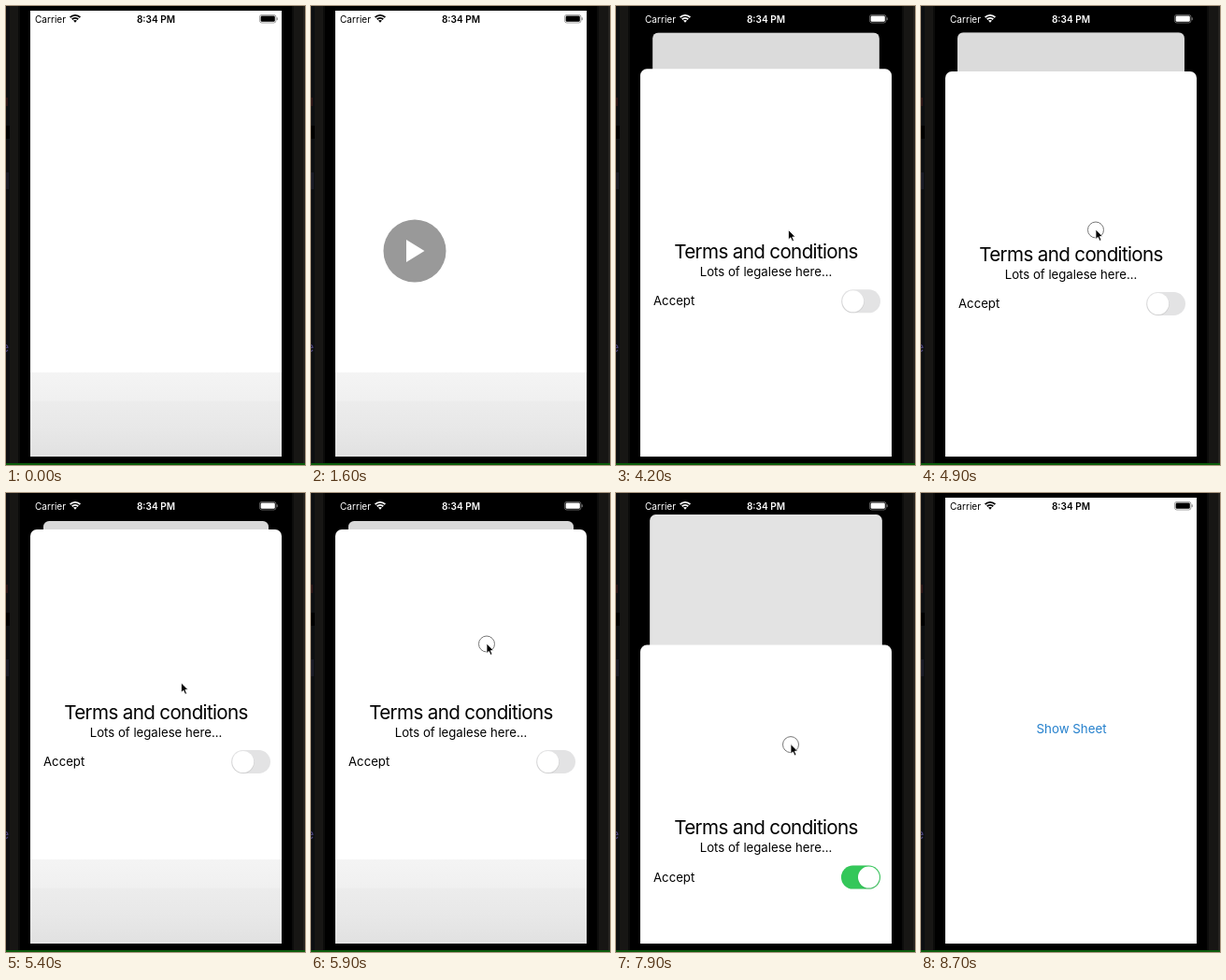
Recreate the animation shown at these times as an HTML page with a canvas. Size 320x491 px, loop 9.6 s.

```html
<!DOCTYPE html>
<html lang="en">
<head>
<meta charset="utf-8">
<title>Sheet demo</title>
<style>
html, body { margin: 0; width: 100%; height: 100%; overflow: hidden; background: #000; }
canvas { display: block; width: 320px; height: 491px; }
</style>
</head>
<body>
<canvas id="stage"></canvas>
<script>
const W = 320, H = 491, LOOP = 9600, STEP = 100;
const SCREEN = { x: 26, y: 5, w: 269, h: 477 };
const BOTTOM = SCREEN.y + SCREEN.h, REST = 39;
const FONT = 'Inter, Roboto, sans-serif';
const canvas = document.getElementById('stage');
const ctx = canvas.getContext('2d');
const dpr = window.devicePixelRatio || 1;
canvas.width = W * dpr;
canvas.height = H * dpr;

const clamp = v => Math.max(0, Math.min(1, v));
const ramp = (t, a, b) => clamp((t - a) / (b - a));
const linear = u => u;
const easeOut = u => 1 - (1 - u) ** 3;
const easeIn = u => u * u;
const easeBoth = u => u * u * (3 - 2 * u);

// Each key: time, values..., easing into that key
function track(keys, t) {
  let prev = keys[0];
  if (t <= prev.t) return prev.v;
  for (const key of keys) {
    if (t < key.t) {
      const u = (key.ease || easeBoth)((t - prev.t) / (key.t - prev.t));
      return prev.v.map((v, i) => v + (key.v[i] - v) * u);
    }
    prev = key;
  }
  return prev.v;
}
const key = (t, v, ease) => ({ t, v, ease });

const sheetKeys = [
  key(3900, [BOTTOM]), key(4400, [REST], easeOut), key(4600, [REST]),
  key(4900, [70], linear), key(5000, [72]), key(5400, [REST], easeOut),
  key(5900, [REST]), key(6200, [68], linear), key(6500, [REST], easeOut),
  key(7600, [REST]), key(8100, [245], linear), key(8600, [BOTTOM], easeOut)
];
const cursorKeys = [
  key(3300, [264, -9]), key(3500, [295, 70]), key(3900, [184, 254]),
  key(4100, [184, 254]), key(4500, [187, 161]), key(4600, [187, 161]),
  key(4900, [187, 239], linear), key(5100, [187, 245]), key(5700, [188, 161]),
  key(5900, [188, 161]), key(6200, [188, 236], linear), key(6300, [190, 238]),
  key(6700, [278, 305]), key(7000, [267, 289]), key(7300, [267, 289]),
  key(7600, [187, 145]), key(8100, [187, 351], linear), key(8500, [187, 355])
];
const presses = [[3900, 4000], [4600, 5000], [5900, 6300], [7200, 7300], [7600, 8200]];

function rect(x, y, w, h, fill) {
  ctx.fillStyle = fill;
  ctx.fillRect(x, y, w, h);
}

function round(x, y, w, h, r, fill) {
  ctx.beginPath();
  ctx.roundRect(x, y, w, h, r);
  ctx.fillStyle = fill;
  ctx.fill();
}

function disc(x, y, r, fill) {
  ctx.beginPath();
  ctx.arc(x, y, r, 0, 7);
  ctx.fillStyle = fill;
  ctx.fill();
}

function polygon(points, fill) {
  ctx.beginPath();
  points.forEach(([x, y]) => ctx.lineTo(x, y));
  ctx.closePath();
  ctx.fillStyle = fill;
  ctx.fill();
}

function text(str, x, y, size, fill, { align = 'center', weight = 400, gap = 0 } = {}) {
  ctx.font = `${weight} ${size}px ${FONT}`;
  ctx.letterSpacing = gap + 'px';
  ctx.textAlign = align;
  ctx.textBaseline = 'alphabetic';
  ctx.fillStyle = fill;
  ctx.fillText(str, x, y);
  ctx.letterSpacing = '0px';
}

function drawBezel() {
  rect(0, 0, W, H, '#000');
  rect(0, 0, 4, 489, '#0d0f12');
  rect(4, 0, 10, 489, '#171614');
  rect(13, 0, 2, 489, '#0b0b0a');
  rect(306, 0, 12, 489, '#171614');
  rect(306, 0, 2, 489, '#0c0c0b');
  rect(318, 0, 2, 489, '#24221f');
  rect(0, 98, 2, 9, '#2c1616');
  rect(0, 128, 4, 14, '#000');
  rect(0, 178, 3, 18, '#1a1b26');
  text('e', -4.5, 370, 13, '#4c4583', { align: 'left' });
  rect(0, 489, W, 2, '#0b5c0b');
}

function drawShade() {
  const g = ctx.createLinearGradient(0, 392, 0, BOTTOM);
  [[0, '#f4f4f4'], [0.33, '#f0f0f0'], [0.35, '#ececec'], [0.66, '#e8e8e8'], [1, '#e1e1e1']]
    .forEach(([at, color]) => g.addColorStop(at, color));
  rect(SCREEN.x, 392, SCREEN.w, BOTTOM - 392, g);
}

function drawHome(t, p) {
  const scale = 1 - p * 28 / SCREEN.w;
  ctx.save();
  ctx.translate(SCREEN.x + 14 * p, SCREEN.y + 25 * p);
  ctx.scale(scale, scale);
  ctx.translate(-SCREEN.x, -SCREEN.y);
  ctx.beginPath();
  ctx.roundRect(SCREEN.x, SCREEN.y, SCREEN.w, SCREEN.h, p > 0 ? 7 : 0);
  ctx.clip();
  rect(SCREEN.x, SCREEN.y, SCREEN.w, SCREEN.h, '#fff');
  if (t < 4300) drawShade();
  ctx.globalAlpha = t < 4300 ? ramp(t, 2500, 3100) : 1;
  text('Show Sheet', 161, 256.8, 13.3, '#2580cd');
  ctx.globalAlpha = 1;
  rect(SCREEN.x, SCREEN.y, SCREEN.w, SCREEN.h, `rgba(0,0,0,${0.15 * p})`);
  ctx.restore();
}

function drawPlay(t) {
  if (t < 1600 || t >= 2000) return;
  const u = (t - 1600) / 400;
  ctx.save();
  ctx.translate(111, 262);
  ctx.scale(1 + u * 0.58, 1 + u * 0.58);
  ctx.globalAlpha = 1 - u;
  disc(0, 0, 33.5, '#999');
  polygon([[-9, -12], [-9, 12], [10.5, 0]], '#fff');
  ctx.restore();
}

function drawToggle(x, y, on) {
  round(x, y, 42, 25, 12.5, '#e3e3e4');
  ctx.globalAlpha = on;
  round(x, y, 42, 25, 12.5, '#34c759');
  ctx.globalAlpha = 1;
  const kx = x + 12.7 + on * 16.8;
  disc(kx, y + 13.2, 12, 'rgba(0,0,0,0.08)');
  disc(kx, y + 12.5, 11.5, '#fff');
}

function drawSheet(t, y) {
  if (y >= BOTTOM) return;
  ctx.save();
  ctx.beginPath();
  ctx.rect(SCREEN.x, SCREEN.y, SCREEN.w, SCREEN.h);
  ctx.clip();
  round(SCREEN.x, y, SCREEN.w, H, 7, '#fff');
  if (t >= 5400 && t < 6000) drawShade();
  text('Terms and conditions', 160.5, y + 202.5, 20.6, '#000', { gap: -0.65 });
  text('Lots of legalese here...', 160.5, y + 221.5, 13.2, '#000');
  text('Accept', 40, y + 253, 13.2, '#000', { align: 'left' });
  drawToggle(241, y + 236, easeBoth(ramp(t, 7200, 7500)));
  ctx.restore();
}

function drawStatus(color) {
  text('Carrier', 31, 17.6, 10.1, color, { align: 'left' });
  text('8:34 PM', 160.5, 17.6, 10.1, color, { weight: 600 });
  ctx.strokeStyle = color;
  ctx.lineWidth = 1.9;
  for (const r of [4.6, 7.6]) {
    ctx.beginPath();
    ctx.arc(74, 17.5, r, -Math.PI * 0.75, -Math.PI * 0.25);
    ctx.stroke();
  }
  polygon([[74, 17.8], [72, 15.6], [74, 14.9], [76, 15.6]], color);
  ctx.globalAlpha = 0.45;
  ctx.lineWidth = 0.8;
  ctx.beginPath();
  ctx.roundRect(271.4, 9.4, 17.6, 8.6, 2.4);
  ctx.stroke();
  round(289.6, 12.2, 1.2, 3, 0.6, color);
  ctx.globalAlpha = 1;
  round(272.6, 10.6, 15.2, 6.2, 1.3, color);
}

function drawCursor(t) {
  if (t < 3300 || t >= 8500) return;
  const [x, y] = track(cursorKeys, t);
  if (presses.some(([a, b]) => t >= a && t < b)) {
    ctx.beginPath();
    ctx.arc(x, y + 0.5, 8.5, 0, 7);
    ctx.strokeStyle = '#777';
    ctx.lineWidth = 1;
    ctx.stroke();
  }
  ctx.save();
  ctx.translate(x, y);
  polygon([[0, 0], [0, 10.5], [2.4, 8.3], [4.2, 12.3], [6, 11.5], [4.3, 7.6], [7.5, 7.5]], '#000');
  ctx.strokeStyle = '#fff';
  ctx.lineWidth = 0.8;
  ctx.stroke();
  ctx.restore();
}

function draw(t) {
  ctx.setTransform(dpr, 0, 0, dpr, 0, 0);
  const [y] = track(sheetKeys, t);
  const p = clamp((BOTTOM - y) / (BOTTOM - REST));
  drawBezel();
  drawHome(t, p);
  drawPlay(t);
  drawSheet(t, y);
  drawStatus(p > 0.4 ? '#fff' : '#000');
  drawCursor(t);
}

const start = performance.now();
function tick() {
  const t = (performance.now() - start) % LOOP;
  draw(Math.floor(t / STEP) * STEP);
  requestAnimationFrame(tick);
}
tick();
</script>
</body>
</html>
```
